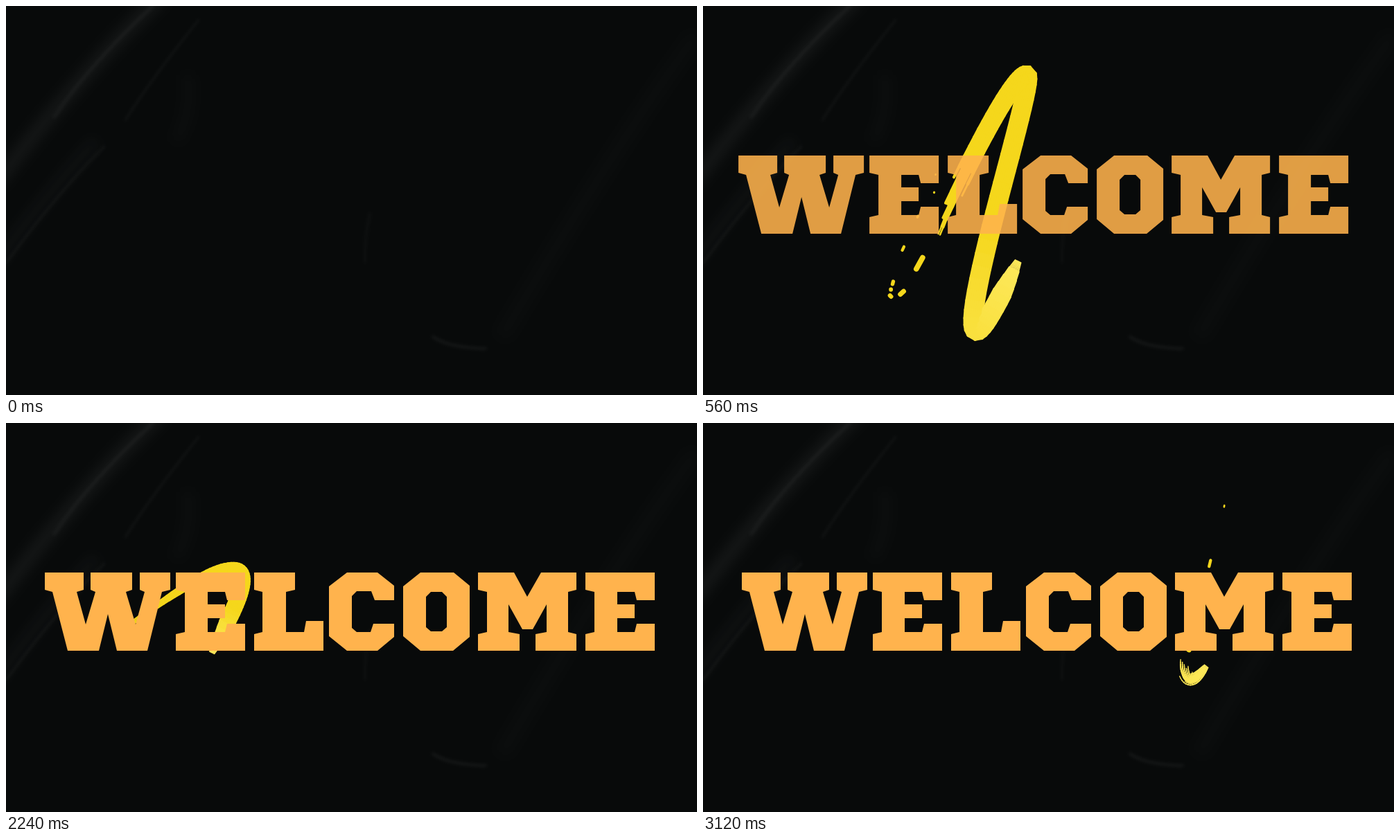
Animation, 997 px wide and 562 px high, one loop 3.2 s. Source, as an HTML page with a canvas:

```html
<!DOCTYPE html>
<html lang="en">
<head>
<meta charset="utf-8">
<title>Welcome</title>
<style>
  html, body { margin: 0; width: 100%; height: 100%; overflow: hidden; background: #070909; }
  svg, canvas { position: absolute; left: 0; top: 0; width: 997px; height: 562px; }
  #word { fill: #ffb34d; fill-rule: evenodd; }
</style>
</head>
<body>
<svg viewBox="0 0 997 562" aria-hidden="true">
  <defs>
    <filter id="soft" x="-50%" y="-50%" width="200%" height="200%"><feGaussianBlur stdDeviation="9"/></filter>
    <filter id="crisp" x="-50%" y="-50%" width="200%" height="200%"><feGaussianBlur stdDeviation="2"/></filter>
    <path id="scribble" d="M163 302C245 245 290 211 325 211C350 211 344 240 318 290C280 365 265 400 267 412
      C271 440 310 400 346 306C420 150 455 99 467 99C482 99 385 400 390 460C394 510 460 350 500 280
      C570 130 605 97 620 97C645 97 545 400 553 465C560 510 590 470 646 330C690 210 720 140 739 92
      C775 20 755 130 735 210C700 310 690 340 696 360C702 385 720 360 733 342C770 285 800 250 834 238"/>
  </defs>
  <rect width="997" height="562" fill="#080a0a"/>
  <g fill="none" stroke="#fff" stroke-linecap="round">
    <g filter="url(#soft)">
      <path d="M220 -10Q110 95 -10 250" stroke-width="20" stroke-opacity=".05"/>
      <path d="M125 200Q60 270 -10 365" stroke="#aab" stroke-width="20" stroke-opacity=".035"/>
      <path d="M262 105Q268 150 248 190" stroke-width="14" stroke-opacity=".02"/>
      <path d="M990 50Q880 200 720 470" stroke-width="26" stroke-opacity=".01"/>
    </g>
    <g filter="url(#crisp)">
      <path d="M212 0Q120 85 70 160" stroke-width="5" stroke-opacity=".035"/>
      <path d="M278 20Q210 105 172 165M142 203Q70 275 0 372" stroke-width="2" stroke-opacity=".06"/>
      <path d="M525 300Q517 335 518 370" stroke-width="4" stroke-opacity=".025"/>
      <path d="M616 478Q640 494 692 495" stroke-width="4" stroke-opacity=".05"/>
    </g>
  </g>
</svg>
<canvas id="paint" width="997" height="562"></canvas>
<svg viewBox="0 0 997 562" role="img" aria-label="WELCOME">
  <g id="word">
    <path d="M56 216H112V241L102 244 115 291 129 244 122 241V216H182V241L173 244 187 291 200 244 193 241V216H237V241L225 244 204 329H160L147 276 134 329H89L67 244 56 241Z"/>
    <path id="e" d="M245 216H345V256H319L316 244H291V262H316V282H291V302H316L319 290H345V329H245V305L258 302V244L245 241Z"/>
    <path d="M358 216H417V241L404 244V302H430L433 286H458V329H358V305L370 302V244L358 241Z"/>
    <path d="M492 216H536L560 235V256H532L527 243H506L499 250V296L506 302H526L530 290H560V309L536 329H492L466 308V236Z"/>
    <path d="M598 216H646L669 235V309L645 329H598L573 308V236ZM613 244L606 251V295L613 301H629L636 295V251L629 244Z"/>
    <path d="M681 216H733L752 251 772 216H823V241L811 244V302L823 305V329H764V305L780 302V262L760 298H745L725 262V302L741 305V329H681V305L694 302V244L681 241Z"/>
    <use href="#e" x="591"/>
  </g>
</svg>
<script>
const STEP = 80, LOOP_STEPS = 40, STROKE_STEPS = 24, FIRST = 2;
const LANES = 9, PER_CURVE = 24, LAG = 2;
const word = document.getElementById('word');
const ctx = document.getElementById('paint').getContext('2d');
ctx.lineCap = 'round';

const clamp01 = v => Math.max(0, Math.min(1, v));
const easeOut = (x, power) => 1 - (1 - clamp01(x)) ** power;
const noise = n => { const v = Math.sin(n * 127.1) * 43758.5; return v - Math.floor(v); };

// Sample the scribble's cubic curves; u counts curves from the start
const coords = document.getElementById('scribble').getAttribute('d').match(/\d+/g).map(Number);
const CURVES = (coords.length - 2) / 6;

function pointAt(u) {
  const curve = Math.min(CURVES - 1, Math.floor(u)), t = u - curve, r = 1 - t;
  const weights = [r * r * r, 3 * r * r * t, 3 * r * t * t, t * t * t];
  const axis = c => weights.reduce((sum, w, i) => sum + w * coords[curve * 6 + i * 2 + c], 0);
  return { u, x: axis(0), y: axis(1) };
}

const path = Array.from({ length: CURVES * PER_CURVE + 1 }, (_, i) => pointAt(i / PER_CURVE));
path.forEach((p, i) => {
  const a = path[Math.max(0, i - 1)], b = path[Math.min(path.length - 1, i + 1)];
  const l = Math.hypot(b.x - a.x, b.y - a.y);
  p.nx = (a.y - b.y) / l;
  p.ny = (b.x - a.x) / l;
  p.len = i ? a.len + Math.hypot(p.x - a.x, p.y - a.y) : 0;
  p.width = Math.min(5 + 14 * p.u, 21 + p.u, 32 - (p.u - 11) * 4);
});
const lengthAt = u => path[Math.round(u * PER_CURVE)].len;

// The brush slows towards the end of the scribble; its tail follows later
const brushAt = step => CURVES * easeOut((step - .7) / 17.3, 2.05);

function line(a, b, width) {
  ctx.lineWidth = width;
  ctx.beginPath();
  ctx.moveTo(a.x, a.y);
  ctx.lineTo(b.x, b.y);
  ctx.stroke();
}

function drawBrush(step) {
  const end = lengthAt(brushAt(step)), start = lengthAt(brushAt(step - LAG));
  const fray = Math.min(130, start, (end - start) * .5), reach = Math.min(350, end * .2);
  for (let k = 0; k < LANES; k++) {
    const from = start + noise(k + 3) * fray, side = (k + .5) / LANES - .5;
    let prev = null;
    for (const p of path) {
      if (p.len < from) continue;
      if (p.len > end) break;
      const gap = end - p.len, glow = clamp01(1 - gap / reach);
      const w = p.width * Math.sqrt(clamp01((gap + 8) / 60));
      const thick = w / LANES * 1.6 * clamp01(.25 + (p.len - from) / 50);
      const dot = { x: p.x + p.nx * side * w, y: p.y + p.ny * side * w };
      ctx.strokeStyle = `rgb(${245 + 8 * glow},${215 + 17 * glow},${28 + 62 * glow})`;
      if (prev) line(prev, dot, thick);
      prev = dot;
    }
  }
}

// Specks of paint linger for a moment after the tail has passed
function drawFlecks(step) {
  const newest = brushAt(step - LAG), oldest = brushAt(step - LAG - 1.5);
  ctx.strokeStyle = '#f5d71c';
  for (let n = 0; n < CURVES * 4; n++) {
    const u = (n + noise(n)) / 4;
    if (u < oldest || u > newest) continue;
    const fresh = (u - oldest) / (newest - oldest), drift = (noise(n + 50) - .5) * 14;
    const a = pointAt(u), b = pointAt(Math.min(CURVES, u + .12 * fresh * noise(n + 90)));
    a.x += drift;
    b.x += drift;
    line(a, b, 2 + 6 * fresh);
  }
}

function render(frame) {
  const shown = easeOut((frame - FIRST + .5) / 7, 1.35);
  word.setAttribute('opacity', shown);
  word.setAttribute('transform', `translate(${-39 * (1 - shown)} 0)`);
  ctx.clearRect(0, 0, 997, 562);
  const step = frame % STROKE_STEPS - FIRST;
  if (step < 0 || step > 20) return;
  drawFlecks(step);
  drawBrush(step);
}

const begin = performance.now();
let last = -1;
function tick() {
  const frame = Math.floor((performance.now() - begin) / STEP) % LOOP_STEPS;
  if (frame !== last) render(last = frame);
  requestAnimationFrame(tick);
}
tick();
</script>
</body>
</html>
```
